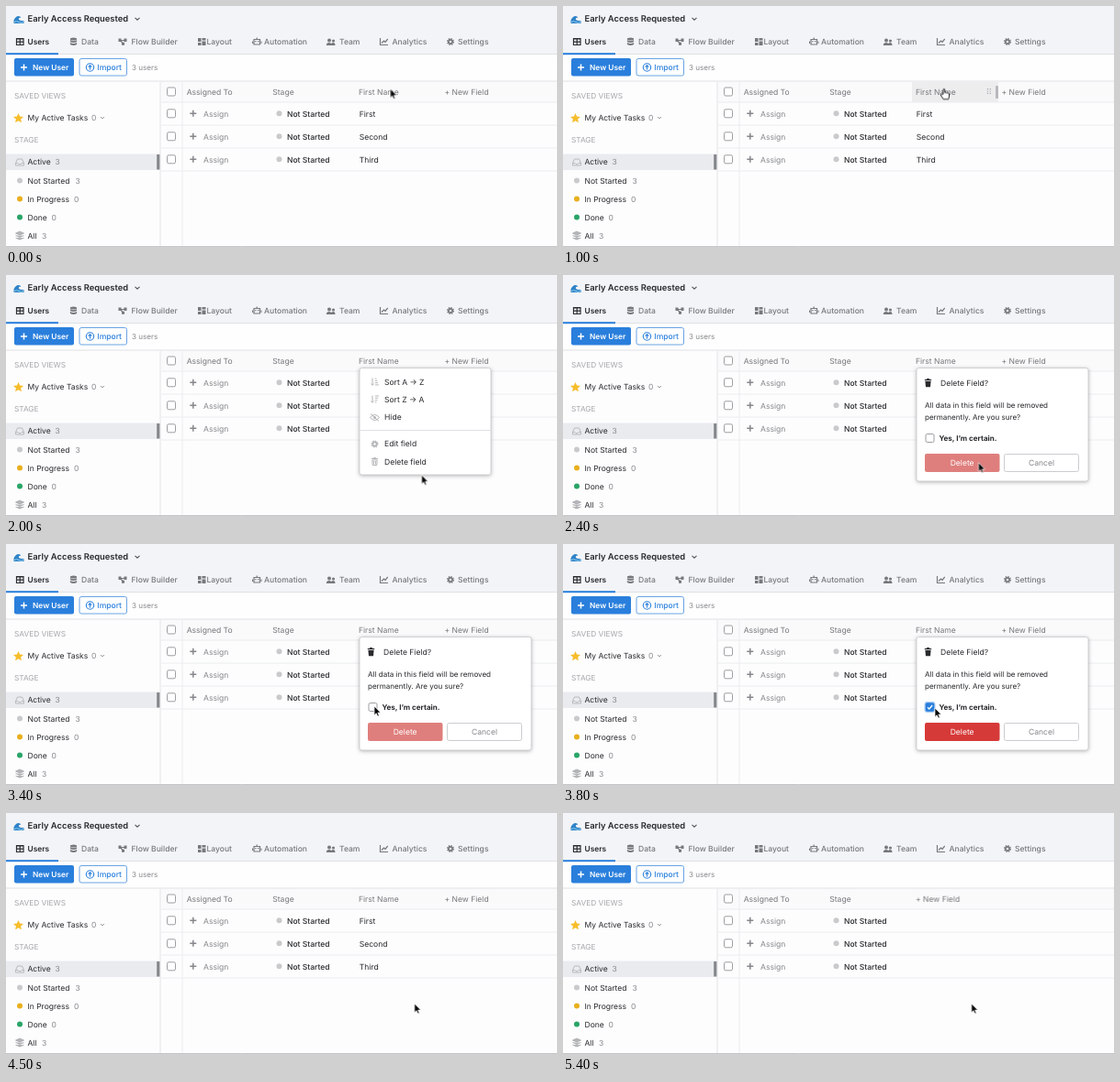
Write an HTML page that moves like this. It is 600 by 263 pixels and loops after 5500 ms.

```html
<!DOCTYPE html>
<html lang="en">
<head>
<meta charset="utf-8">
<title>Delete a field</title>
<style>
  html, body { margin: 0; width: 100%; height: 100%; overflow: hidden; background: #fdfdfe; }
  svg { display: block; width: 600px; height: 263px; }
  text { font-family: Inter, "Open Sans", sans-serif; font-size: 8.55px; fill: #26282b; text-rendering: geometricPrecision; white-space: pre; }
  .title { font-size: 9.4px; font-weight: 600; }
  .tab, .head { fill: #75777b; }
  .tab { font-weight: 500; font-size: 8.55px; }
  .bold { font-weight: 600; font-size: 8.35px; }
  .stage { font-weight: 500; font-size: 8.5px; }
  .side { font-size: 8.5px; }
  .label { fill: #a5a7aa; font-size: 8.3px; }
  .dim { fill: #85878a; }
  .small { font-size: 8.05px; }
  .blue { fill: #2a7fdc; }
  .white { fill: #fff; }
  svg { color: #76787c; }
  .pale { color: #b3b5b8; }
  .line { fill: none; stroke: currentColor; stroke-width: 1.2; }
  .solid { fill: currentColor; }
  .box { fill: #fff; stroke: #929497; stroke-width: .9; }
  .card { fill: #fff; stroke: #c6c8cb; stroke-width: .8; filter: drop-shadow(0 1px 2px #0004); }
</style>
</head>
<body>
<svg viewBox="0 0 600 263" xmlns="http://www.w3.org/2000/svg">
  <defs>
    <g id="gear">
      <circle class="line" r="2.1" style="stroke-width:1.7"/>
      <circle class="line" r="3.3" style="stroke-width:1.4" stroke-dasharray="1.4 1.19"/>
    </g>
    <path id="plus" d="M-3.5 0H3.5M0-3.5V3.5" fill="none" stroke-width="1.5"/>
    <path id="down" d="M-2.5-1.2L0 1.2 2.5-1.2" fill="none" stroke-width="1.1"/>
    <rect id="check" class="box" x="-4.5" y="-4.5" width="9" height="9" rx="1.6"/>
  </defs>

  <!-- page frame -->
  <rect width="600" height="52" fill="#f3f4f7"/>
  <rect y="52" width="600" height="30" fill="#fefefe"/>
  <path d="M0 52.5H600M0 82H600" stroke="#dfe0e3"/>
  <rect y="51.2" width="57" height="2" class="blue"/>
  <path d="M8.500 18.500V15.500q2-4.500 5-4.500 2.500 0 2.700 2-2-.6-2.400.9 0 2.100 5.700 2.300V19H8.500z" fill="#2f83c8"/>
  <path d="M9 17.500q2.500-1.600 5 0t5 0" fill="none" stroke="#8fd0ee"/>
  <use href="#down" x="143" y="14" stroke="#55575a"/>

  <!-- tab icons -->
  <g>
    <path d="M11.500 36H19M11.500 39.200H19M15.200 36V42.500M11.500 35.500H19V42.500H11.500z" class="line" style="stroke:#2b2d30"/>
    <g class="solid"><ellipse cx="73.500" cy="36" rx="3.600" ry="1.500"/><path d="M69.900 37.200q3.600 1.900 7.200 0V39q-3.600 1.900-7.200 0zM69.900 40q3.600 1.900 7.200 0V42q-3.600 1.900-7.200 0z"/></g>
    <path d="M124.500 37.500H129.500M125 38L127.500 41" class="line"/>
    <path d="M122.500 35.500h3v3.500h-3zM128.500 35.500h3v3.500h-3zM126 39.800h3v3h-3z" class="solid"/>
    <path d="M209 35h3.500v4H209zM213.500 35h4v2.500h-4zM209 40h3.500v3H209zM213.500 38.500h4V43h-4z" class="solid"/>
    <path d="M270 36.500h6.500v5.500H270zM273.200 36.500V34.500" class="line"/>
    <path d="M268 38.500h1v2.500h-1zM277.500 38.500h1v2.500h-1zM271.300 38h1.300v1.300h-1.300zM274 38h1.300v1.300H274z" class="solid"/>
    <path d="M348.800 43q0-3 3-3 1.700 0 2.400 1 .7-1 2-1 2.300 0 2.300 3z" class="solid"/>
    <circle cx="352" cy="37.500" r="2" class="solid"/><circle cx="356.500" cy="38" r="1.600" class="solid"/>
    <path d="M407.500 35V42.500H416M409 40.500L411.500 38 413 39.300 415.700 36" class="line"/>
    <use href="#gear" x="484" y="39"/>
  </g>

  <!-- toolbar -->
  <rect x="9" y="57" width="65" height="19.500" rx="2" class="blue"/>
  <use href="#plus" x="19.500" y="67" stroke="#fff"/>
  <rect x="80" y="57.500" width="51.500" height="18.500" rx="2" fill="#fff" stroke="#69a4e4"/>
  <circle cx="91.500" cy="67" r="4.200" fill="none" stroke="#2a7fdc" stroke-width="1.100"/>
  <path d="M91.500 69.500V65M89.600 66.600L91.500 64.700 93.400 66.600" fill="none" stroke="#2a7fdc" stroke-width="1.100"/>
  <g id="top"></g>

  <!-- sidebar -->
  <rect y="161.500" width="168" height="17.500" fill="#e9ebef"/>
  <rect x="164.200" y="162" width="3.400" height="16.500" fill="#85878b"/>
  <path d="M168 83V263" stroke="#e2e3e6"/>
  <path d="M13.500 117l1.600 3.500 3.900.4-2.900 2.600.8 3.800-3.400-2-3.400 2 .8-3.800-2.900-2.600 3.900-.4z" fill="#f6bd2c"/>
  <use href="#down" x="105" y="122" stroke="#909295" transform="translate(21 24.400) scale(.8)"/>
  <path d="M10.500 171.500L12.500 167h5l2 4.500V174h-9zM10.500 171.500h2.500l1 1.200h2l1-1.200h2.500" class="line pale" style="stroke-width:.9"/>
  <circle cx="15" cy="190.500" r="3" fill="#c9cacc"/>
  <circle cx="15" cy="210.500" r="3" fill="#e9b01e"/>
  <circle cx="15" cy="230.500" r="3" fill="#2aa568"/>
  <path d="M10.500 248L15 246l4.500 2-4.500 2zM10.500 250.500L15 252.500l4.500-2M10.500 253L15 255l4.500-2" fill="#b5b7ba" stroke="#a4a6a9" stroke-width=".8"/>

  <!-- table -->
  <rect x="169" y="83" width="431" height="22" fill="#fafafb"/>
  <rect id="hover" x="380" y="83" width="94" height="22" fill="#ededee"/>
  <path d="M169 105H600M169 130H600M169 155H600M169 180H600" stroke="#ebecee"/>
  <path d="M192 83V263" stroke="#ebecee"/>
  <use href="#check" x="180" y="93.500"/>
  <g id="rows"></g>
  <g id="column"></g>
  <g id="grip">
    <path d="M462.500 90v7M465.300 90v7" stroke="#a5a7aa" stroke-width="1.200" stroke-dasharray="1.200 1.200"/>
    <rect x="471" y="87" width="3" height="14" rx="1" fill="#b7b9bc"/>
  </g>
  <g id="newField"></g>
  <path d="M0 262.500H600" stroke="#c3c4c8"/>

  <!-- field menu -->
  <g id="menu">
    <rect x="385" y="101.500" width="143" height="116.500" rx="2.500" class="card"/>
    <rect id="itemHover" x="389" y="194.500" width="135" height="18.500" rx="2" fill="#eceef0"/>
    <path d="M385 169.500H528" stroke="#e0e1e4"/>
    <g class="pale">
      <path d="M399 112.500V120M397.300 118.500L399 120.300 400.700 118.500M402 113h1.500M402 115.300h2.300M402 117.600h3.100M402 119.900h3.900" class="line" style="stroke-width:1"/>
      <path d="M399 131.500V139M397.300 137.500L399 139.300 400.700 137.500M402 132h3.900M402 134.300h3.100M402 136.600h2.300M402 138.900h1.500" class="line" style="stroke-width:1"/>
      <path d="M396.500 155.500q5-6 10 0-5 6-10 0zM397 151.500L406 159.500" class="line" style="stroke-width:1"/>
      <circle cx="401.500" cy="155.500" r="1.500" class="solid"/>
      <use href="#gear" x="401.500" y="184.500"/>
      <path d="M398 200.500h7M400.300 199.500h2.400M398.800 202h5.400l-.4 5.500h-4.600zM400.600 203v3.500M402.500 203v3.500" class="line" style="stroke-width:1"/>
    </g>
  </g>

  <!-- confirmation -->
  <g id="dialog">
    <rect x="385" y="101.500" width="187" height="123.500" rx="2.500" class="card"/>
    <path d="M393.800 114h7.400v1.300h-7.400zM396 113h3v1.500h-3zM394.400 116h6.200l-.6 6.300h-5z" fill="#292b2e"/>
    <use href="#check" x="399.500" y="178"/>
    <g id="checked">
      <rect x="393.500" y="172" width="12" height="12" rx="3" fill="#a8ccf3"/>
      <rect x="394.700" y="173.200" width="9.600" height="9.600" rx="1.800" class="blue"/>
      <path d="M397 178.200L398.800 180 402.200 176" fill="none" stroke="#fff" stroke-width="1.300"/>
    </g>
    <rect id="delete" x="394" y="195" width="81.500" height="20" rx="2" fill="#df7f7d"/>
    <rect x="480.500" y="195.500" width="81" height="19" rx="2" fill="#fff" stroke="#cbccd0"/>
  </g>

  <g id="cursor">
    <path id="arrow" d="M0 0V9.700L2.200 7.700 3.700 11.100 5.300 10.400 3.900 7.100H6.900z" fill="#080808" stroke="#fff" stroke-width=".7"/>
    <path id="hand" d="M-1 6V1a.9.900 0 0 1 1.800 0V4.200q.9-.6 1.600.2.900-.5 1.600.3 1.500-.3 1.500 1.200V8q0 1.400-.8 3.200H-.8Q-2.200 9-3.700 7-3.900 5.800-2.700 5.800z" fill="#fff" stroke="#111" stroke-width=".9"/>
  </g>
</svg>
<script>
const NS = "http://www.w3.org/2000/svg";
const LOOP = 5500;
const $ = id => document.getElementById(id);

function add(parent, tag, attrs, content = "") {
  const node = document.createElementNS(NS, tag);
  for (const key in attrs) node.setAttribute(key, attrs[key]);
  node.textContent = content;
  return parent.appendChild(node);
}
const label = (id, x, y, content, cls = "") =>
  add($(id), "text", { x, y, class: cls }, content);

label("top", 23.5, 17.4, "Early Access Requested", "title");
label("top", 23.5, 42.2, "Users", "bold");
[["Data", 82], ["Flow Builder", 136.5], ["Layout", 218.5], ["Automation", 281],
 ["Team", 363], ["Analytics", 420.5], ["Settings", 492]]
  .forEach(([name, x]) => label("top", x, 42.2, name, "tab"));

label("top", 29, 70, "New User", "bold white");
label("top", 99.3, 70, "Import", "tab blue");
label("top", 137, 70, "3 users", "small dim");
label("top", 9, 101, "SAVED VIEWS", "label");
label("top", 9, 149, "STAGE", "label");
[["My Active Tasks", 125.3, 0, 93], ["Active", 173.4, 3, 53.5],
 ["Not Started", 193.6, 3, 75.5], ["In Progress", 213.6, 0, 74],
 ["Done", 233.6, 0, 49.5], ["All", 253.8, 3, 39]]
  .forEach(([name, y, count, x]) => {
    label("rows", 23.5, y, name, "side");
    label("rows", x, y, count, "side dim");
  });

label("rows", 196.7, 96.7, "Assigned To", "head");
label("rows", 290.3, 96.7, "Stage", "head");
label("column", 384, 96.7, "First Name", "head");
label("newField", 477.5, 96.7, "+ New Field", "head");
["First", "Second", "Third"].forEach((name, i) => {
  const y = 117.3 + 25 * i;
  add($("rows"), "use", { href: "#check", x: 180, y });
  add($("rows"), "use", { href: "#plus", x: 203.8, y, stroke: "#85878a" });
  add($("rows"), "circle", { cx: 297.5, cy: y, r: 3, fill: "#c9cacc" });
  label("rows", 215, y + 3.2, "Assign", "dim");
  label("rows", 306, y + 3.2, "Not Started", "stage");
  label("column", 384.7, y + 3.2, name);
});

[["Sort A → Z", 119.7], ["Sort Z → A", 139], ["Hide", 158.3],
 ["Edit field", 187.4], ["Delete field", 206.5]]
  .forEach(([name, y]) => label("menu", 412, y, name));

label("dialog", 411, 120.9, "Delete Field?");
label("dialog", 394, 145.3, "All data in this field will be removed", "small");
label("dialog", 394, 158.2, "permanently. Are you sure?", "small");
label("dialog", 409.5, 181.2, "Yes, I’m certain.", "small").style.fontWeight = 700;
label("dialog", 421.7, 208.3, "Delete", "white");
label("dialog", 507, 208.3, "Cancel", "dim");

// Steps are [time, value, ticks]; ticks > 1 moves on to the next value in that many jumps.
function play(id, prop, steps) {
  const frames = steps.map(([time, value, ticks = 1]) =>
    ({ offset: time / LOOP, [prop]: value, easing: `steps(${ticks}, end)` }));
  frames.push({ offset: 1, [prop]: steps[steps.length - 1][1] });
  $(id).animate(frames, { duration: LOOP, iterations: Infinity });
}
const at = (x, y) => `translate(${x}px, ${y}px)`;
const show = (id, ...steps) => play(id, "opacity", [[0, 0], ...steps]);

play("cursor", "transform", [
  [0, at(418.5, 90.4)], [500, at(416, 90.4)], [600, at(415, 90.4)],
  [1200, at(417, 100), 3], [1500, at(450, 220)], [1600, at(452, 223)],
  [1700, at(453, 224)], [2000, at(452.6, 218.3)], [2100, at(453, 210)],
  [2200, at(452.5, 204.7)], [3000, at(450, 203), 3], [3300, at(404, 179)],
  [3400, at(401, 177)], [3800, at(405, 179), 3], [4100, at(445, 207.5)],
  [4500, at(444.7, 208)]
]);
show("hand", [500, 1], [1200, 0], [2100, 1], [2200, 0], [4100, 1], [4500, 0]);
play("arrow", "opacity", [[0, 1], [500, 0], [1200, 1], [2100, 0], [2200, 1], [4100, 0], [4500, 1]]);

show("grip", [500, 1], [1200, 0]);
show("hover", [1000, 1], [1200, 0]);
show("menu", [1100, .5], [1200, 1], [2200, 0]);
$("menu").style.transformOrigin = "385px 101px";
play("menu", "transform", [[0, "scale(1)"], [1100, "scale(.9)"], [1200, "scale(1)"]]);
show("itemHover", [2100, 1], [2200, 0]);
show("dialog", [2200, 1], [4400, .5], [4500, 0]);
show("checked", [3600, 1]);
play("delete", "fill", [[0, "#df7f7d"], [3600, "#d63a38"], [4100, "#c02427"]]);
play("column", "opacity", [[0, 1], [4600, 0]]);
play("newField", "transform", [[0, at(0, 0)], [4600, at(-93.5, 0)]]);
</script>
</body>
</html>
```
